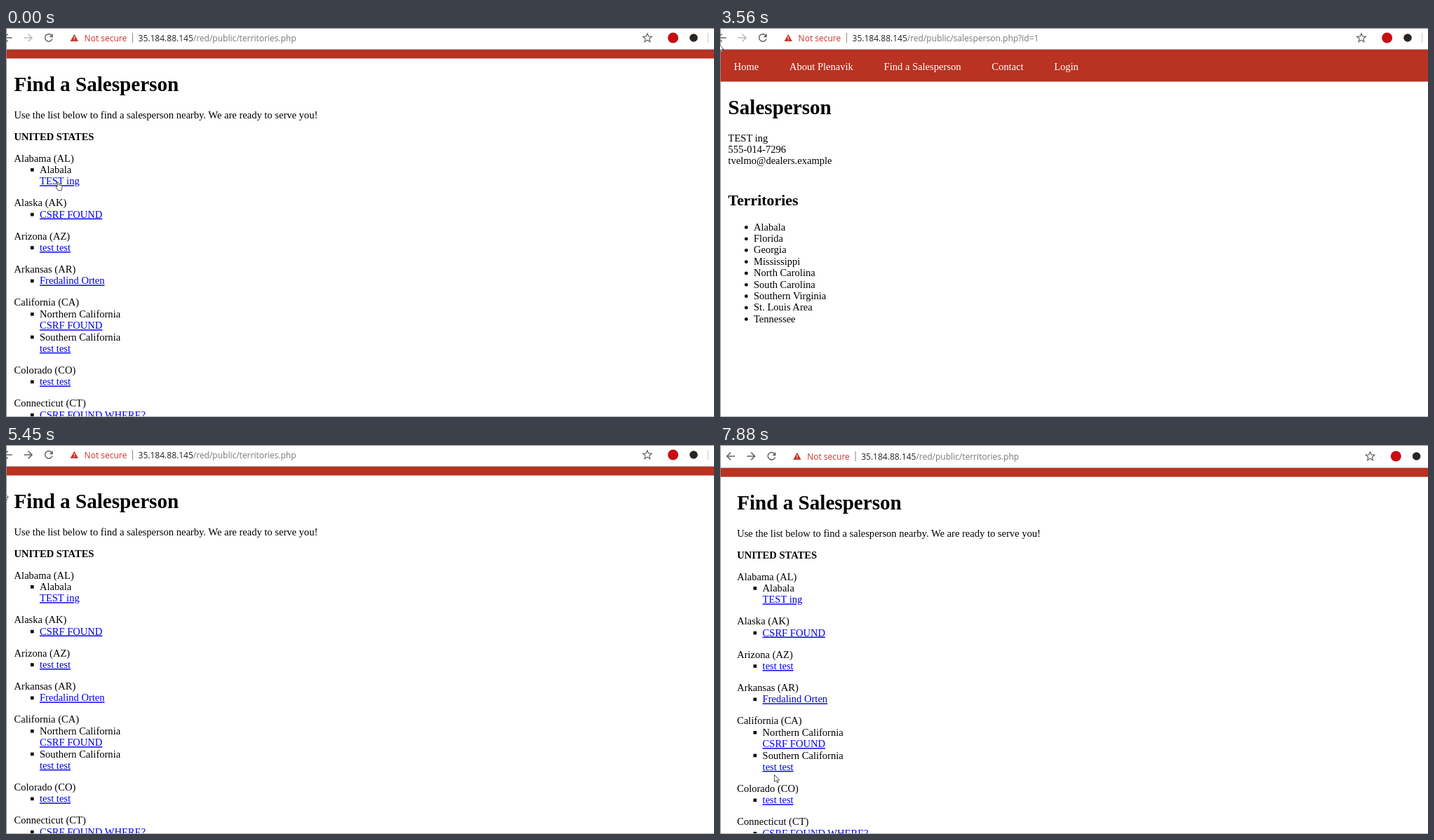
An HTML page for the animation above (8000 ms loop, 1009 by 555 pixels).

```html
<!DOCTYPE html>
<html lang="en">
<head>
<meta charset="utf-8">
<title>Find a Salesperson</title>
<style>
html, body { margin: 0; width: 100%; height: 100%; overflow: hidden; background: #fff; }
svg { display: block; width: 100vw; height: 100vh; }
.page text { font: 14.56px "Liberation Serif", "Times New Roman", serif; fill: #000; }
.page .h1 { font-size: 29.12px; font-weight: bold; }
.page .h2 { font-size: 21.84px; font-weight: bold; }
.page .b { font-weight: bold; }
.page .link { fill: #00e; text-decoration: underline; }
.page .nav { fill: #fff; }
.ui text { font: 12px "Open Sans", "Noto Sans", sans-serif; fill: #75787b; }
.ui .host { fill: #202124; }
.ui .warn { fill: #cb3228; }
.icon { fill: none; stroke: #5f6368; stroke-width: 1.5; }
.cursor { fill: #fff; stroke: #3c3f4a; stroke-width: .9; stroke-linejoin: round; }
</style>
</head>
<body>
<svg id="stage" viewBox="0 0 1009 555" preserveAspectRatio="none"></svg>
<script>
const LOOP = 8000;
const LINE = 16.38, GAP = 31, LEFT = 11.6, INDENT = 48;
const RED = '#b93222', EDGE = '#8c8c8c';

const text = (x, y, s, cls = '') =>
  `<text x="${x}" y="${y.toFixed(2)}" class="${cls}">${s}</text>`;
const rect = (x, y, w, h, fill, more = '') =>
  `<rect x="${x}" y="${y}" width="${w}" height="${h}" fill="${fill}" ${more}/>`;
const disc = (x, y, r, fill, more = '') =>
  `<circle cx="${x}" cy="${y.toFixed(2)}" r="${r}" fill="${fill}" ${more}/>`;
const path = (d, more = 'class="icon"') => `<path d="${d}" ${more}/>`;
const show = (id, on) => el[id].setAttribute('display', on ? 'inline' : 'none');
const move = (id, x, y) => el[id].setAttribute('transform', `translate(${x} ${y})`);

// Each entry: state, then lines; '*' starts a bullet, '_' marks a link.
const states = [
  ['Alabama (AL)', '*Alabala', '_TEST ing'],
  ['Alaska (AK)', '*_CSRF FOUND'],
  ['Arizona (AZ)', '*_test test'],
  ['Arkansas (AR)', '*_Fredalind Orten'],
  ['California (CA)', '*Northern California', '_CSRF FOUND', '*Southern California', '_test test'],
  ['Colorado (CO)', '*_test test'],
  ['Connecticut (CT)', '*_CSRF FOUND WHERE?']
];

function territories() {
  let y = 128.5;
  let out = rect(-20, 31, 1050, 12.5, RED)
    + text(LEFT, 90, 'Find a Salesperson', 'h1')
    + text(LEFT, y, 'Use the list below to find a salesperson nearby. We are ready to serve you!')
    + text(LEFT, y += GAP, 'UNITED STATES', 'b');
  for (const [name, ...rows] of states) {
    out += text(LEFT, y += GAP, name);
    for (const row of rows) {
      y += LINE;
      if (row[0] === '*') out += rect(35, (y - 6.8).toFixed(2), 4.6, 4.6, '#000');
      out += text(INDENT, y, row.replace(/[*_]/g, ''), row.includes('_') ? 'link' : '');
    }
  }
  return out;
}

function salesperson() {
  const nav = ['Home', 'About Plenavik', 'Find a Salesperson', 'Contact', 'Login'];
  const contact = ['TEST ing', '555-014-7296', 'tvelmo@dealers.example'];
  const areas = ['Alabala', 'Florida', 'Georgia', 'Mississippi', 'North Carolina',
    'South Carolina', 'Southern Virginia', 'St. Louis Area', 'Tennessee'];
  const rows = (x, y, list) => list.map((s, i) => text(x, y + i * LINE, s)).join('');
  return rect(-20, 31, 1050, 45.5, RED)
    + text(19.7, 59.7, nav.join('</tspan><tspan dx="43.7">')
      .replace('</tspan>', '') + '</tspan>', 'nav')
    + text(LEFT, 122.8, 'Salesperson', 'h1')
    + rows(LEFT, 161.5, contact)
    + text(LEFT, 252.5, 'Territories', 'h2')
    + areas.map((s, i) => disc(37.4, 284.4 + i * LINE, 2.4, '#000')).join('')
    + rows(INDENT, 288.7, areas);
}

function star(cx, cy, r) {
  const points = Array.from({ length: 10 }, (_, i) => {
    const a = i * Math.PI / 5, d = i % 2 ? r * .45 : r;
    return (cx + d * Math.sin(a)).toFixed(2) + ' ' + (cy - d * Math.cos(a)).toFixed(2);
  });
  return path('M' + points.join('L') + 'Z', 'class="icon" style="stroke-width:1.2"');
}

// Arrow icon centred on x; dir is -1 for back, 1 for forward.
const arrowIcon = (x, dir, id) =>
  path('M-5.7 0H5.7M.3 -5.4L5.7 0L.3 5.4',
    `id="${id}" class="icon" transform="translate(${x} 14) scale(${dir} 1)"`);

function toolbar() {
  return rect(-20, 0, 1050, 30, '#fff') + rect(-20, 30, 1050, 1, '#b8b2b2')
    + disc(2.6, 14, 12.6, '#e4e5e6', 'id="hover"')
    + path('M454.5 1H92.5a13 13 0 0 0 0 26H454.5Z', 'id="field" fill="#f1f3f4"')
    + arrowIcon(3, -1, 'back') + arrowIcon(31.4, 1, 'next')
    + `<g id="reload">${path('M64.9 10.3A5.3 5.3 0 1 0 66 15.4')}`
    + path('M66.9 8V13.2H61.7Z', 'fill="#5f6368"') + '</g>'
    + path('M55.8 8.9L66 19.1M66 8.9L55.8 19.1', 'id="stop" class="icon"')
    + path('M97.3 8.8L103 19H91.6Z', 'fill="#cb3228"')
    + path('M97.3 12.2V15.2M97.3 16.3V17.6', 'stroke="#fff" stroke-width="1.1"')
    + text(111.6, 18.6, 'Not secure', 'warn')
    + rect(180, 7, 1, 14, '#85888c')
    + text(188.6, 18.6, '<tspan class="host">35.184.88.145</tspan><tspan id="url"></tspan>')
    + star(914, 14.3, 6.6)
    + disc(950.7, 14, 7.5, '#c70d12')
    + disc(980, 14, 5.8, '#2a2520')
    + rect(1000, 7, 1, 14, '#c9cbce');
}

const stage = document.getElementById('stage');
stage.innerHTML = rect(0, 0, 1009, 555, '#fff')
  + `<g id="view"><g class="page"><g id="list">${territories()}</g>`
  + `<g id="person">${salesperson()}</g></g><g class="ui">${toolbar()}</g></g>`
  + rect(0, 0, 1009, 1, EDGE) + rect(0, 554, 1009, 1, '#b4b4b4')
  + rect(0, 0, 1, 555, EDGE, 'id="side"')
  + path('M0 0V10L2.3 8L4 11.6L5.5 10.9L3.9 7.5H7.1Z', 'id="arrow" class="cursor"')
  + path('M2.3 7.2V1.2Q3.3 -.2 4.3 1.2V4.6L7.9 5.4Q9.3 5.8 9.2 7.2L8.3 12.4H3.3L.4 8.2Q.5 6.4 2.3 7.2Z',
    'id="hand" class="cursor" transform="translate(70.8 219.3)"');

const el = {};
stage.querySelectorAll('[id]').forEach(node => { el[node.id] = node; });

const BEAT = 144.4, FIRST = 655;
const glides = [
  { from: 0, to: 1, x: 288, y: 262 },
  { from: 3, to: 8, x: 0, y: 15 },
  { from: 13, to: 15, x: -1.5, y: 23 },
  { from: 20, to: 23, x: 4.5, y: 17 },
  { from: 25, to: 28, x: 35, y: 44 },
  { from: 28, to: 33, x: -3.6, y: 67 },
  { from: 40, to: 42, x: 86.5, y: 195 },
  { from: 43, to: 44, x: 143.5, y: 394 },
  { from: 45, to: 50, x: 77.6, y: 470.5 }
];

const within = (t, a, b) => t >= a && t < b;
const ramp = (t, a, b) => Math.min(1, Math.max(0, (t - a) / (b - a)));
const easeOut = u => 1 - (1 - u) ** 3;
const easeInOut = u => u * u * (3 - 2 * u);

function pointerAt(beat) {
  let x = 247, y = 243;
  for (const g of glides) {
    const k = easeInOut(ramp(beat, g.from, g.to));
    x += (g.x - x) * k;
    y += (g.y - y) * k;
  }
  return [x, y];
}

function draw(t) {
  const beat = Math.floor((t - FIRST) / BEAT);
  const pan = easeOut(ramp(beat, 35.8, 38));
  const panning = pan > 0 && pan < 1;
  const person = within(t, 660, 4290);
  const leaving = within(t, 4150, 4290);
  const loading = leaving || within(t, 260, 660);
  move('view', 12.6 * pan, Math.round(2 * pan));
  move('arrow', ...pointerAt(beat));
  el.side.setAttribute('x', panning ? 1008 : 0);
  show('hand', t < 660);
  show('arrow', t >= 660);
  show('person', person);
  show('list', !person);
  show('hover', within(t, 3710, 4290));
  show('field', leaving);
  show('stop', loading);
  show('reload', !loading);
  el.next.style.stroke = t < 4150 ? '#babcbe' : '#5f6368';
  el.url.textContent = '/red/public/' +
    (person && !leaving ? 'salesperson.php?id=1' : 'territories.php');
}

const start = performance.now();
function tick() {
  draw((performance.now() - start) % LOOP);
  requestAnimationFrame(tick);
}
tick();
</script>
</body>
</html>
```
